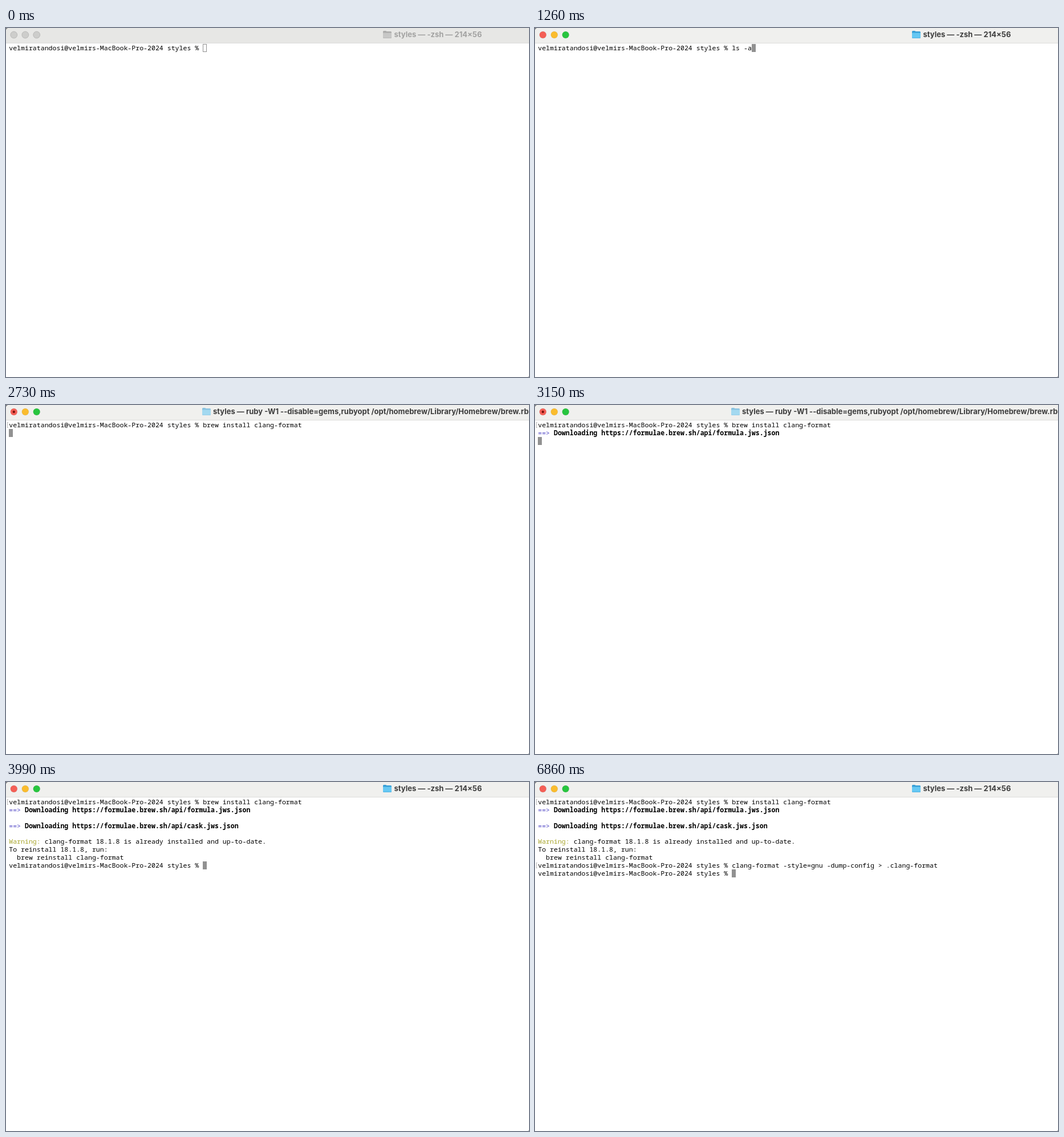
These frames come from a looping animation (917x611 px, 8 s). An HTML page:

```html
<!DOCTYPE html>
<html lang="en">
<meta charset="utf-8">
<title>Terminal</title>
<style>
  html, body { margin: 0; width: 100%; height: 100%; overflow: hidden; background: #777; }
  #window { position: absolute; inset: 0; overflow: hidden; background: #fff; border-radius: 5px 0 2px 0; }
  #window > * { position: absolute; margin: 0; }
  #bar { left: 0; top: 0; width: 100%; height: 26px; background: #f0f0ee; border-bottom: 1px solid #dcdcdb; }
  #chrome { left: 0; top: 0; }
  #chrome circle { stroke: #0002; stroke-width: .5; }
  #title { top: 3px; font: bold 13px/17px Inter, sans-serif; color: #3d3d3d; white-space: pre; }
  #screen { left: 5.2px; top: 28px; font: 500 11.57px/13.88px "Noto Sans Mono", "DejaVu Sans Mono", monospace; color: #000; }
  #screen u { color: #4a40c4; text-decoration: none; }
  #screen em { color: #a8a52c; font-style: normal; }
  #cursor { width: 7px; height: 14px; box-sizing: border-box; background: #919191; }
  .mark { left: 2px; width: 2px; height: 10px; box-sizing: border-box; border: 1px solid #bbb; border-right: 0; }
  .idle #bar { background: #e7e7e5; }
  .idle #title { color: #a2a2a1; }
  .idle #chrome circle { fill: #cdcdcb; stroke-width: 1; }
  .idle #folder { filter: grayscale(1); opacity: .65; }
  .idle #cursor { background: none; border: 1px solid #919191; }
  .busy #folder { opacity: .55; }
  #chrome #dot { fill: #7c120c; stroke: none; visibility: hidden; }
  .busy #chrome #dot { visibility: visible; }
</style>
<div id="window">
  <div id="bar"></div>
  <svg id="chrome" width="917" height="26">
    <circle cx="13.8" cy="12" r="6" fill="#f45f56"/>
    <circle cx="33.8" cy="12" r="6" fill="#fabc2e"/>
    <circle cx="53.7" cy="12" r="6" fill="#28c53f"/>
    <circle id="dot" cx="13.8" cy="12" r="2.2"/>
    <g id="folder">
      <path d="M0 1.5Q0 0 1.5 0H5L6.5 1H13.5Q15 1 15 2.5V11.5Q15 13 13.5 13H1.5Q0 13 0 11.5Z" fill="#389fd6"/>
      <path d="M0 3.5H15V11Q15 12.4 13.5 12.4H1.5Q0 12.4 0 11Z" fill="#66c8f3"/>
    </g>
  </svg>
  <div id="title"></div>
  <pre id="screen"></pre>
  <div id="cursor"></div>
  <div class="mark" style="top:30px"></div>
  <div class="mark" style="top:141px"></div>
</div>
<script>
const LOOP = 8000, ROW = 13.88, COLUMN = 6.94;
const $ = id => document.getElementById(id);
const marks = document.querySelectorAll('.mark');

const prompt = 'velmiratandosi@velmirs-MacBook-Pro-2024 styles % ';
const install = 'brew install clang-format';
const dump = 'clang-format -style=gnu -dump-config &gt; .clang-format';
const edit = 'vim .clang-format';
const download = name =>
  `<u>==&gt;</u> <b>Downloading https://formulae.brew.sh/api/${name}.jws.json</b>\n`;

// Recalled shell history: each entry replaces the one before
const firstCommand = [[0, ''], [910, 'ls -lart'], [1120, edit], [1260, 'ls -a'], [1750, dump], [1890, install]];
const secondCommand = [[0, ''], [4760, install], [4970, 'ls -lart'], [5320, edit], [5740, 'ls -a'], [6090, dump]];

// Output: each entry is appended
const output = [
  [2660, '\n'],
  [3080, download('formula')],
  [3220, '\n'],
  [3570, download('cask')],
  [3640, '\n'],
  [3990, '<em>Warning:</em> clang-format 18.1.8 is already installed and up-to-date.\n' +
    'To reinstall 18.1.8, run:\n  brew reinstall clang-format\n' + prompt]
];
const ending = [[6790, '\n'], [6860, prompt]];

const started = (list, t) => list.filter(([start]) => start <= t).map(entry => entry[1]);
const current = (list, t) => started(list, t).pop();
const printed = (list, t) => started(list, t).join('');

let shown;
function draw(t) {
  const busy = t >= 2660 && t < 3990;
  const html = prompt + current(firstCommand, t) + printed(output, t) +
    current(secondCommand, t) + printed(ending, t);
  if (html !== shown) $('screen').innerHTML = shown = html;

  const lines = $('screen').textContent.split('\n');
  $('cursor').style.left = Math.round(5 + lines.at(-1).length * COLUMN) + 'px';
  $('cursor').style.top = Math.round(28 + (lines.length - 1) * ROW) + 'px';

  $('window').className = t < 280 ? 'idle' : busy ? 'busy' : '';
  $('title').textContent = busy
    ? 'styles — ruby -W1 --disable=gems,rubyopt /opt/homebrew/Library/Homebrew/brew.rb'
    : 'styles — -zsh — 214×56';
  $('title').style.left = (busy ? 363 : 680.5) + 'px';
  $('folder').setAttribute('transform', `translate(${busy ? 344 : 661} 5)`);
  marks[0].hidden = t < 2660;
  marks[1].hidden = t < 6790;
}

const origin = performance.now();
function tick() {
  draw((performance.now() - origin) % LOOP);
  requestAnimationFrame(tick);
}
tick();
</script>
</html>
```
